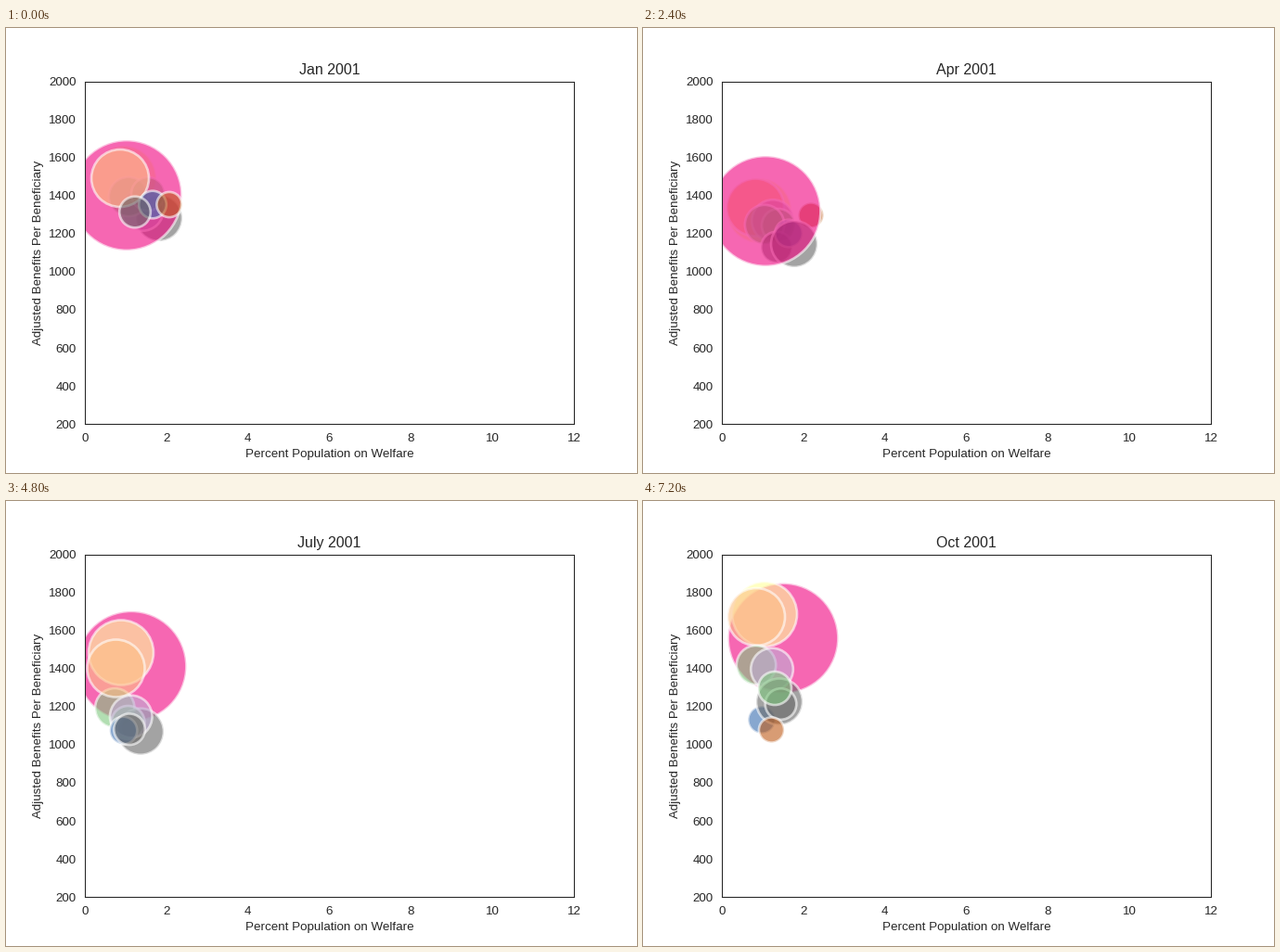
Write a matplotlib script that moves like this. It is 680 px wide and 480 px high and loops after 8000 ms.

```python
import numpy as np
import matplotlib.pyplot as plt
from matplotlib.animation import FuncAnimation

W, H, DPI = 680, 480, 80
PT = 72 / DPI  # points per pixel
INK = ".15"
TITLES = ["Jan", "Feb", "Mar", "Apr", "May", "June", "July", "Aug", "Sep", "Oct"]

# Radius in pixels and fill of each bubble
STYLE = {
    "pink": (59.4, "#f0027f"), "yellow": (35, "#ffff99"),
    "orange": (31, "#fdc086"), "gray": (25, "#666666"),
    "purple": (22.8, "#beaed4"), "green": (21.2, "#7fc97f"),
    "moss": (18, "#7fc97f"), "slate": (16.8, "#666666"),
    "blue": (14.8, "#386cb0"), "brown": (13.6, "#bf5b17"),
}

# Bubble centres in pixels, listed from back to front
KEYS = {
    0: dict(yellow=(127, 162), gray=(165, 205), purple=(147, 196),
            green=(132, 182), moss=(153, 179), pink=(130, 180.5),
            orange=(123, 162), blue=(158, 190.5), slate=(139, 198.5),
            brown=(176, 190.5)),
    1: dict(orange=(123, 190), purple=(141, 222), slate=(136, 213),
            blue=(155, 213), pink=(127, 206.5), brown=(173.5, 204.5),
            moss=(148, 202), yellow=(126, 188), green=(131, 204.5),
            gray=(159, 216)),
    3: dict(yellow=(125, 197), orange=(121, 193.5), purple=(140, 208),
            moss=(146, 213), green=(131, 212), slate=(144, 236.5),
            blue=(157, 221.5), brown=(181, 202), gray=(163, 233),
            pink=(132, 197.5)),
    5: dict(pink=(131, 186.5), green=(115, 225), yellow=(119, 168),
            orange=(116, 183.5), brown=(141, 235), gray=(142, 248),
            moss=(129, 239), purple=(130.5, 231), blue=(127, 252),
            slate=(130, 252.5)),
    7: dict(pink=(139, 170), yellow=(129, 159), orange=(121, 177.5),
            purple=(139, 234), gray=(148, 249.5), moss=(134, 239),
            green=(119.5, 221.5), slate=(136, 240), brown=(134, 253),
            blue=(126, 243)),
    8: dict(brown=(129, 272), blue=(122, 256), yellow=(131, 201),
            orange=(122, 206), green=(118, 223), moss=(135, 239),
            purple=(136, 241), gray=(144, 266.5), pink=(143, 204.5),
            slate=(139, 259.5)),
    9: dict(pink=(151, 148), yellow=(131, 122), orange=(122, 125),
            green=(122, 177), purple=(139, 181.5), blue=(128, 236),
            gray=(147, 216.5), slate=(148.5, 219), brown=(138.5, 247),
            moss=(142, 202)),
}


def layout(month):
    """Centres for a month; a month without an entry lies between its neighbours."""
    if month in KEYS:
        return KEYS[month]
    before, after = KEYS[month - 1], KEYS[month + 1]
    return {k: np.add(before[k], after[k]) / 2 for k in before}


def to_data(points):
    x, y = np.array(list(points), float).T
    return np.column_stack([(x - 85) / 527 * 12, 2000 - (y - 57.6) / 369.6 * 1800])


plt.rcParams.update({
    "font.family": "Liberation Sans", "font.size": 12,
    "text.color": INK, "axes.labelcolor": INK,
    "xtick.color": INK, "ytick.color": INK,
})
fig = plt.figure(figsize=(W / DPI, H / DPI), dpi=DPI, facecolor="white")
ax = fig.add_axes([0.125, 0.11, 0.775, 0.77])
ax.set(xlim=(0, 12), ylim=(200, 2000), xticks=range(0, 13, 2),
       yticks=range(200, 2001, 200))
ax.tick_params(length=0, pad=9.33 * PT)
ax.set_xlabel("Percent Population on Welfare", labelpad=5.33 * PT)
ax.set_ylabel("Adjusted Benefits Per Beneficiary", labelpad=5.33 * PT)
for spine in ax.spines.values():
    spine.set(edgecolor=INK, linewidth=1.07 * PT)
title = ax.set_title("", fontsize=14.4, pad=8 * PT)
bubbles = ax.scatter(np.zeros(10), np.zeros(10), alpha=0.6,
                     edgecolors="white", linewidths=2.67 * PT)


def draw(month):
    spots = layout(month)
    radii = np.array([STYLE[k][0] for k in spots])
    bubbles.set_offsets(to_data(spots.values()))
    bubbles.set_sizes((2 * radii * PT) ** 2, DPI)
    bubbles.set_facecolor([STYLE[k][1] for k in spots])
    title.set_text(f"{TITLES[month]} 2001")
    return bubbles, title


anim = FuncAnimation(fig, draw, frames=len(TITLES), interval=800,
                     repeat=True, repeat_delay=0)
plt.show()
```
